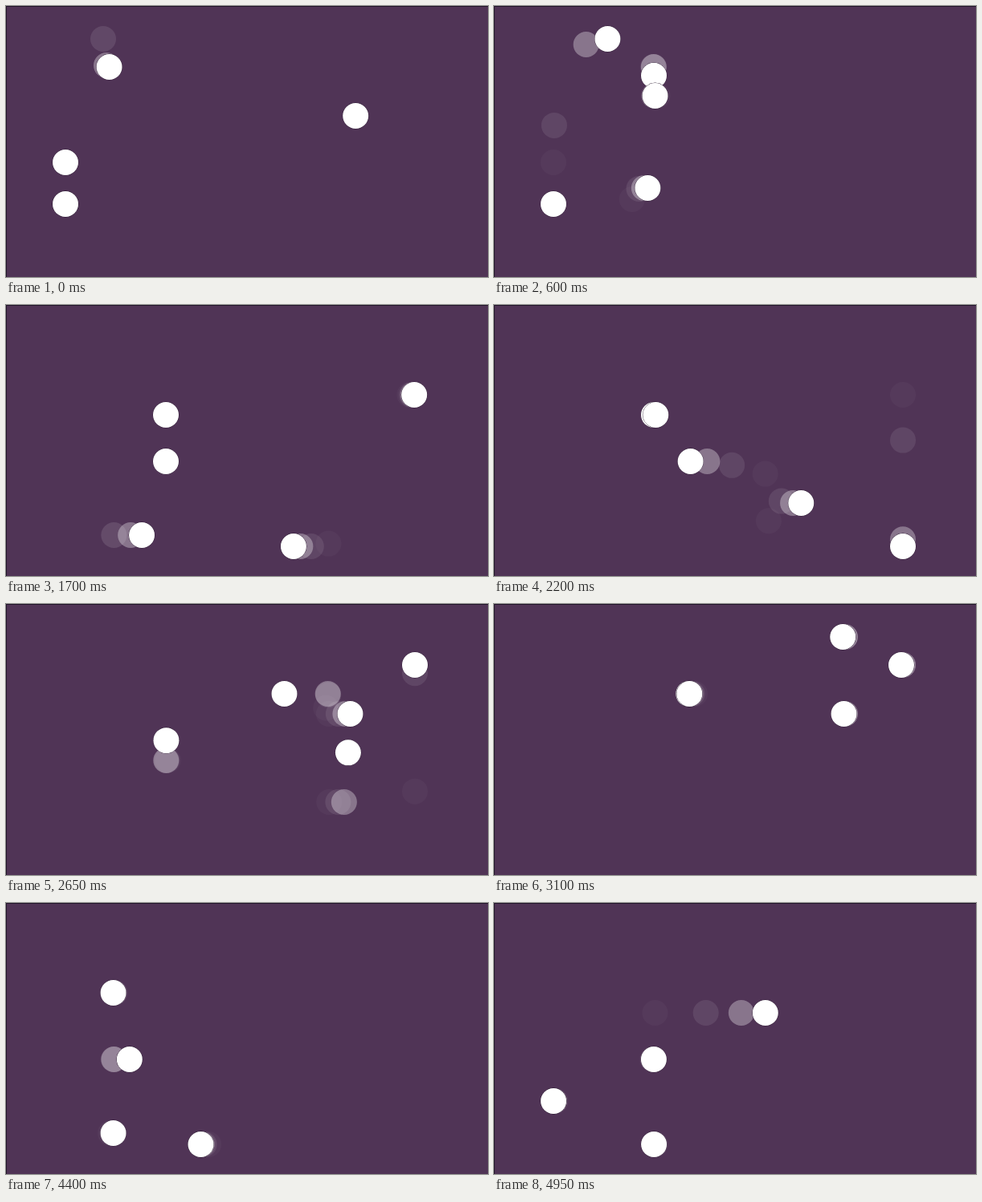
Animation of 600 by 338 pixels, one loop 5000 ms. Source, as an HTML page without scripts:

```html
<!DOCTYPE html>
<html lang="en">
<head>
<meta charset="utf-8">
<title>Gliding dots</title>
<style>
html, body { margin: 0; width: 100%; height: 100%; overflow: hidden; background: #503456; }
svg { display: block; width: 100vw; height: 100vh; }

/* Grid of stops: columns and rows */
:root {
  --c1: 74px; --c2: 134px; --c3: 199px; --c4: 243px;
  --c5: 343px; --c6: 402px; --c7: 437px; --c8: 509px;
  --r1: 41px; --r2: 76px; --r3: 112px; --r4: 137px; --r5: 195px;
  --r6: 227px; --r7: 247px; --r8: 287px; --r9: 301px;
  /* Exponential approach: a glide takes about 12% of the loop, a drop 2% */
  --glide: cubic-bezier(.15, .684, .344, 1);
  --drop: cubic-bezier(0, .7, .1, 1);
}

circle { r: 16px; fill: #fff; }
.dot, .trail {
  animation: 5s infinite backwards;
  animation-name: var(--x), var(--y), appear;
  animation-timing-function: var(--glide), var(--drop), step-end;
  animation-delay: var(--lag, 0s), var(--lag, 0s), 0s;
}
.dot { --a: 1; animation-name: var(--x), var(--y); stroke: #2b1b30; stroke-width: 1px; paint-order: stroke; }
.t1 { --lag: 50ms; --a: .32; }
.t2 { --lag: 100ms; --a: .09; }
.t3 { --lag: 150ms; --a: .03; }
.a { --x: ax; --y: ay; }
.b { --x: bx; --y: by; }
.c { --x: cx; --y: cy; }
.d { --x: dx; --y: dy; }
.e { --x: ex; --y: ey; }
.fade { animation: fade 5s step-end infinite; }

@keyframes appear { 0% { opacity: 0 } 3%, 100% { opacity: var(--a) } }
@keyframes fade { 0% { opacity: 1 } 1% { opacity: .3 } 2%, 100% { opacity: 0 } }

@keyframes ax {
  0% { cx: 128px } 12%, 45% { cx: var(--c3) } 57%, 62% { cx: var(--c7) }
  74%, 88% { cx: var(--c4) } 100% { cx: var(--c3) }
}
@keyframes ay {
  0%, 12% { cy: var(--r2) } 14%, 26% { cy: var(--r3) } 28%, 68% { cy: var(--r4) }
  70%, 78% { cy: var(--r3) } 80%, 100% { cy: var(--r9) }
}
@keyframes bx {
  0% { cx: var(--c7) } 12% { cx: var(--c3) } 24% { cx: var(--c6) }
  36%, 62% { cx: var(--c8) } 74% { cx: var(--c4) } 88% { cx: var(--c2) } 100% { cx: var(--c1) }
}
@keyframes by {
  0%, 6% { cy: var(--r4) } 8%, 42% { cy: var(--r3) } 44%, 50% { cy: var(--r9) }
  52%, 74% { cy: var(--r2) } 76%, 92% { cy: var(--r3) } 94%, 100% { cy: var(--r7) }
}
@keyframes cx {
  0%, 10% { cx: var(--c1) } 22%, 38% { cx: var(--c3) } 50% { cx: var(--c6) }
  62% { cx: var(--c7) } 74% { cx: var(--c1) } 87% { cx: var(--c2) } 100% { cx: var(--c3) }
}
@keyframes cy {
  0%, 10% { cy: var(--r5) } 12%, 18% { cy: var(--r1) } 20%, 22% { cy: var(--r3) }
  24%, 30% { cy: var(--r6) } 32%, 41% { cy: var(--r5) } 43%, 53% { cy: var(--r7) }
  55%, 70% { cy: var(--r1) } 72%, 73% { cy: var(--r8) } 75%, 80% { cy: var(--r3) }
  82%, 100% { cy: var(--r5) }
}
@keyframes dx {
  0%, 18% { cx: var(--c1) } 30%, 32% { cx: var(--c2) } 44% { cx: var(--c3) }
  52% { cx: var(--c6) } 63%, 69% { cx: var(--c4) } 81% { cx: var(--c1) }
  88% { cx: var(--c2) } 100% { cx: var(--c1) }
}
@keyframes dy {
  0%, 14% { cy: var(--r7) } 16%, 37% { cy: var(--r8) } 39%, 50% { cy: var(--r4) }
  52%, 82% { cy: var(--r3) } 84%, 92% { cy: var(--r8) } 94%, 100% { cy: var(--r7) }
}
@keyframes ex {
  0%, 5% { cx: var(--c1) } 17%, 19% { cx: var(--c3) } 31% { cx: var(--c6) }
  41% { cx: var(--c5) } 53% { cx: var(--c3) } 62% { cx: var(--c4) }
  68% { cx: var(--c3) } 80% { cx: var(--c7) } 88% { cx: var(--c4) }
  /* The loop ends partway through the last glide */
  96% { cx: var(--c3); animation-timing-function: cubic-bezier(.333, .627, .667, .853) }
  100% { cx: 358px }
}
@keyframes ey {
  0%, 9% { cy: var(--r7) } 11%, 30% { cy: var(--r6) } 32%, 41% { cy: var(--r9) }
  43%, 53% { cy: var(--r5) } 55%, 66% { cy: var(--r3) } 68%, 82% { cy: var(--r6) }
  84%, 94% { cy: var(--r9) } 96%, 100% { cy: var(--r4) }
}
</style>
</head>
<body>
<svg viewBox="0 0 600 338" preserveAspectRatio="none">
  <rect width="600" height="338" fill="#503456"/>
  <path d="M0 .5H600M.5 0V338" stroke="#21152a"/>
  <g class="fade">
    <circle cx="121" cy="41" fill-opacity=".1"/>
    <circle cx="125" cy="74" fill-opacity=".32"/>
  </g>
  <g class="a"><circle class="trail t3"/><circle class="trail t2"/><circle class="trail t1"/></g>
  <g class="b"><circle class="trail t3"/><circle class="trail t2"/><circle class="trail t1"/></g>
  <g class="c"><circle class="trail t3"/><circle class="trail t2"/><circle class="trail t1"/></g>
  <g class="d"><circle class="trail t3"/><circle class="trail t2"/><circle class="trail t1"/></g>
  <g class="e"><circle class="trail t3"/><circle class="trail t2"/><circle class="trail t1"/></g>
  <circle class="dot a"/>
  <circle class="dot b"/>
  <circle class="dot c"/>
  <circle class="dot e"/>
  <circle class="dot d"/>
</svg>
</body>
</html>
```
